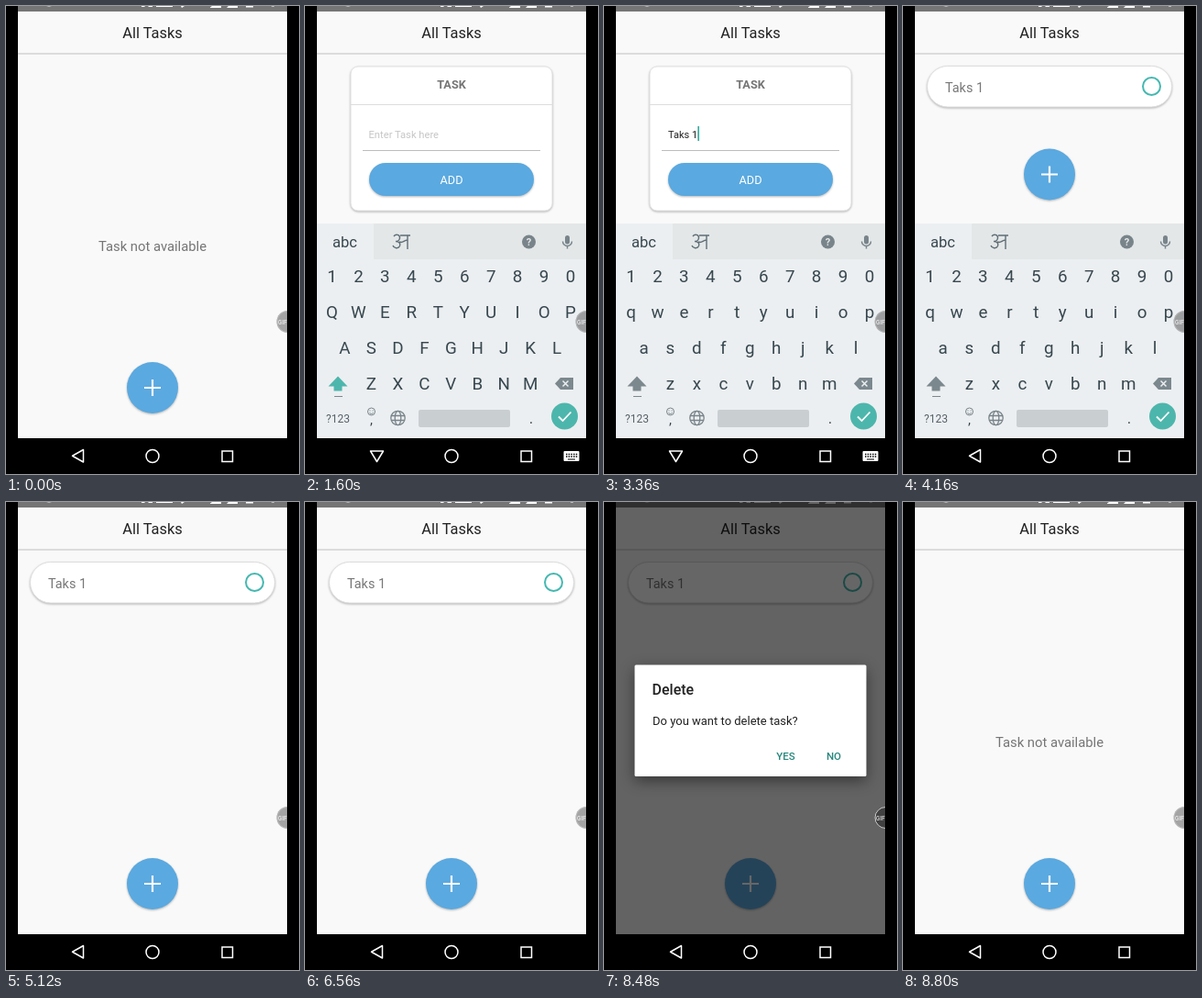
These frames come from a looping animation (320 px wide and 510 px high, 9600 ms). An HTML page:

```html
<!DOCTYPE html>
<html lang="en">
<head>
<meta charset="utf-8">
<title>Task list</title>
<style>
html, body { margin: 0; width: 100%; height: 100%; overflow: hidden; background: #000; }
svg { display: block; width: 320px; height: 510px; font-family: Roboto, "Open Sans", sans-serif; }
.mid { text-anchor: middle; }
.line { fill: none; stroke-width: 1.5; }
.soft { filter: drop-shadow(0 1px 1px rgba(0, 0, 0, .28)); }
.deep { filter: drop-shadow(0 5px 8px rgba(0, 0, 0, .45)); }
</style>
</head>
<body>
<svg viewBox="0 0 320 510">
  <defs>
    <clipPath id="screen"><rect x="13" width="294" height="471"/></clipPath>
  </defs>
  <rect width="320" height="510"/>
  <g clip-path="url(#screen)">
    <rect x="13" width="294" height="471" fill="#f9f9f9"/>
    <rect x="13" width="294" height="6" fill="#757575"/>
    <g fill="#fff">
      <path d="M148 0h3l1 1h3l1-1h4v1h-12zM164 0h18v1h-18zM191 0h4l-3 2zM223 1.500l2-1.500h10v2h-12zM241 2l2-2h10v2zM262 0h8v1.500h-8z"/>
      <path d="M44 0h6l-3 1zM290 0h3v1h-3z" opacity=".5"/>
    </g>
    <rect x="13" y="51" width="294" height="2" fill="#dcdcdc"/>
    <text class="mid" x="160" y="35" font-size="16.4" fill="#212121">All Tasks</text>

    <text id="empty" class="mid" x="160" y="267" font-size="14.8" fill="#757575">Task not available</text>

    <g id="item">
      <rect class="soft" x="26.500" y="65.500" width="267" height="44.500" rx="22.250" fill="#fff" stroke="#dedede"/>
      <text x="46" y="93.500" font-size="14.4" fill="#777">Taks 1</text>
      <circle cx="271.500" cy="87.500" r="9.500" fill="none" stroke="#45b8b0" stroke-width="2"/>
    </g>

    <g id="plus">
      <circle class="soft" r="28" fill="#5aa9e0"/>
      <path d="M-9 0H9M0-9V9" stroke="#fff" stroke-width="2.200"/>
    </g>

    <g id="form">
      <rect class="soft" x="50" y="66" width="220" height="157" rx="8" fill="#fff" stroke="#e2e2e2"/>
      <path d="M50 107.500H270" stroke="#ddd"/>
      <text class="mid" x="160" y="90" font-size="12.700" font-weight="700" fill="#757575">TASK</text>
      <text id="hint" x="69.500" y="144" font-size="11.200" fill="#c6c6c6">Enter Task here</text>
      <text id="typed" x="70" y="144" font-size="11" fill="#212121" xml:space="preserve"></text>
      <rect id="caret" y="131" width="1.500" height="16" fill="#26a69a"/>
      <path d="M63 157.500H257" stroke="#bdbdbd"/>
      <g id="add">
        <rect class="soft" x="70" y="171" width="180" height="36" rx="18" fill="#5aa9e0"/>
        <text class="mid" x="160" y="194" font-size="12.700" fill="#fff">ADD</text>
      </g>
    </g>

    <g id="board">
      <rect x="13" y="237" width="294" height="234" fill="#eceff1"/>
      <rect x="75" y="237" width="232" height="39" fill="#e3e7e8"/>
      <text class="mid" x="43.500" y="263" font-size="16.600" fill="#37474f">abc</text>
      <path d="M97 251C99 248 104 249 103.500 253C103 256 100 256.500 99 256.500C103 256.500 104.500 259 103.500 261.500C102 265 97 264 96 261M103 257C107 259 108 255 112 255M104 250H115M112 250V265" fill="none" stroke="#5f6d74" stroke-width="1.400"/>
      <circle cx="244.500" cy="257" r="7.500" fill="#78848a"/>
      <text class="mid" x="244.500" y="261" font-size="11" font-weight="700" fill="#e3e7e8">?</text>
      <rect x="284" y="250" width="5" height="9.500" rx="2.500" fill="#78848a"/>
      <path class="line" d="M281.500 256.500a5 5 0 0 0 10 0M286.500 261.500v3" stroke="#78848a"/>
      <g id="keys" class="mid" font-size="18.800" fill="#37474f"></g>
      <path id="shift" d="M36 403.500L46.500 414.500H40.500V419.500H31.500V414.500H25.500Z"/>
      <path d="M32 425.500H41" stroke="#7b888e"/>
      <path d="M273 411.500L279 405H293V418H279Z" fill="#7b888e"/>
      <path d="M281.500 408.500l6 6m0-6l-6 6" stroke="#eceff1" stroke-width="1.500"/>
      <text class="mid" x="36" y="454" font-size="12" fill="#546168">?123</text>
      <g fill="none" stroke="#78848a">
        <circle cx="72.500" cy="442" r="4"/>
        <path d="M70.500 443.500q2 2 4 0M71 440.500v1M74 440.500v1"/>
        <g stroke-width="1.300">
          <circle cx="101.500" cy="449" r="7.700"/>
          <ellipse cx="101.500" cy="449" rx="3.300" ry="7.700"/>
          <path d="M94.500 446.500h14M94.500 451.500h14"/>
        </g>
      </g>
      <text class="mid" x="72.500" y="456" font-size="15" fill="#37474f">,</text>
      <rect x="124" y="440" width="100" height="19" rx="2" fill="#c9ced1"/>
      <text class="mid" x="247" y="455" font-size="17" fill="#37474f">.</text>
      <circle cx="283.500" cy="447" r="14.500" fill="#4db6ac"/>
      <path d="M277 447.500l4.500 4.500l9-9.500" fill="none" stroke="#fff" stroke-width="1.800"/>
    </g>

    <rect id="dim" x="13" width="294" height="471"/>
    <g id="dialog">
      <rect class="deep" x="33.500" y="177.500" width="253" height="121.500" rx="1.500" fill="#fff"/>
      <text x="52.500" y="210" font-size="16" font-weight="500" fill="#212121">Delete</text>
      <text x="53" y="243" font-size="13" fill="#212121">Do you want to delete task?</text>
      <g class="mid" font-size="11.500" font-weight="500" fill="#26877d">
        <text x="198.500" y="281">YES</text>
        <text x="251" y="281">NO</text>
      </g>
    </g>

    <circle cx="307.500" cy="344" r="12" fill="#000" fill-opacity=".34"/>
    <circle id="halo" cx="307.500" cy="344" r="11.500" fill="none" stroke="#fff"/>
    <text x="297" y="346.500" font-size="6.500" fill="#fff">GIF</text>
  </g>

  <g class="line" stroke="#fff">
    <path id="back" stroke-linejoin="round"/>
    <circle cx="160" cy="490.500" r="7"/>
    <rect x="236" y="485" width="11.500" height="11.500"/>
  </g>
  <g id="imeIcon">
    <rect x="282.500" y="485" width="17" height="11" rx="1" fill="#fff"/>
    <path d="M285 488.500h12.500M285 491h12.500" stroke="#000" stroke-width="1.300" stroke-dasharray="1.500 1.200"/>
    <path d="M287 494h8" stroke="#000"/>
  </g>
</svg>
<script>
const LOOP = 9600, STEP = 160;
const el = {};
document.querySelectorAll('svg [id]').forEach(n => el[n.id] = n);

// Key rows: characters, first centre x, baseline
const rows = [['1234567890', 29.5, 300.5], ['qwertyuiop', 29.5, 339.5], ['asdfghjkl', 43.5, 378.5], ['zxcvbnm', 72.5, 417.5]];
const keys = rows.flatMap(([chars, x, y]) => [...chars].map((ch, i) => {
  const t = document.createElementNS('http://www.w3.org/2000/svg', 'text');
  t.setAttribute('x', x + i * 28.95);
  t.setAttribute('y', y);
  el.keys.append(t);
  return { t, ch };
}));

// Text in the field from each time on
const typing = [[0, ''], [2080, 'T'], [2240, 'Ta'], [2560, 'Tak'], [2720, 'Taks'], [3040, 'Taks '], [3200, 'Taks 1']];

const ramp = (t, a, b) => Math.min(1, Math.max(0, (t - a) / (b - a)));
const within = (t, a, b) => t >= a && t < b;
const pulse = (t, a, b, c, d) => ramp(t, a, b) - ramp(t, c, d);
const set = (name, attr, value) => el[name].setAttribute(attr, value);
const fade = (name, value) => {
  set(name, 'opacity', value);
  set(name, 'visibility', value > 0 ? 'visible' : 'hidden');
};

function draw(ms) {
  const t = Math.floor((ms % LOOP) / STEP) * STEP;

  fade('empty', within(t, 960, 8800) ? 0 : 1);
  fade('form', pulse(t, 800, 1120, 3680, 4000));
  fade('add', within(t, 3520, 3840) ? .65 : 1);
  fade('item', within(t, 3840, 8800) ? (within(t, 7360, 7840) ? .7 : 1) : 0);

  const raised = within(t, 3840, 4320);
  set('plus', 'transform', `translate(160 ${raised ? 183.5 : 416})`);
  fade('plus', within(t, 960, 3840) ? 0 : within(t, 800, 960) ? .6 : 1);

  const text = typing.filter(([at]) => t >= at).pop()[1];
  el.typed.textContent = text;
  fade('hint', text ? 0 : 1);
  fade('caret', text ? 1 : 0);
  set('caret', 'x', 70.3 + (text ? el.typed.getComputedTextLength() : 0));

  const up = pulse(t, 1120, 1600, 4160, 4480);
  set('board', 'transform', `translate(0 ${234 * (1 - up) ** 2})`);
  fade('board', up > 0 ? 1 : 0);
  const caps = t < 2080;
  keys.forEach(k => k.t.textContent = caps ? k.ch.toUpperCase() : k.ch);
  set('shift', 'fill', caps ? '#4db6ac' : '#7b888e');

  const ime = within(t, 1280, 4000);
  set('back', 'd', ime ? 'M71.500 485H85.500L78.500 496.500Z' : 'M84.500 483.500V497L72.500 490.250Z');
  fade('imeIcon', ime ? 1 : 0);

  const ask = pulse(t, 5120, 5600, 6080, 6560) + pulse(t, 7680, 8160, 8480, 8800);
  fade('dim', ask * .6);
  fade('dialog', ask);
  set('halo', 'opacity', .25 + ask * .5);
}

function frame() {
  draw(performance.now());
  requestAnimationFrame(frame);
}
frame();
</script>
</body>
</html>
```
